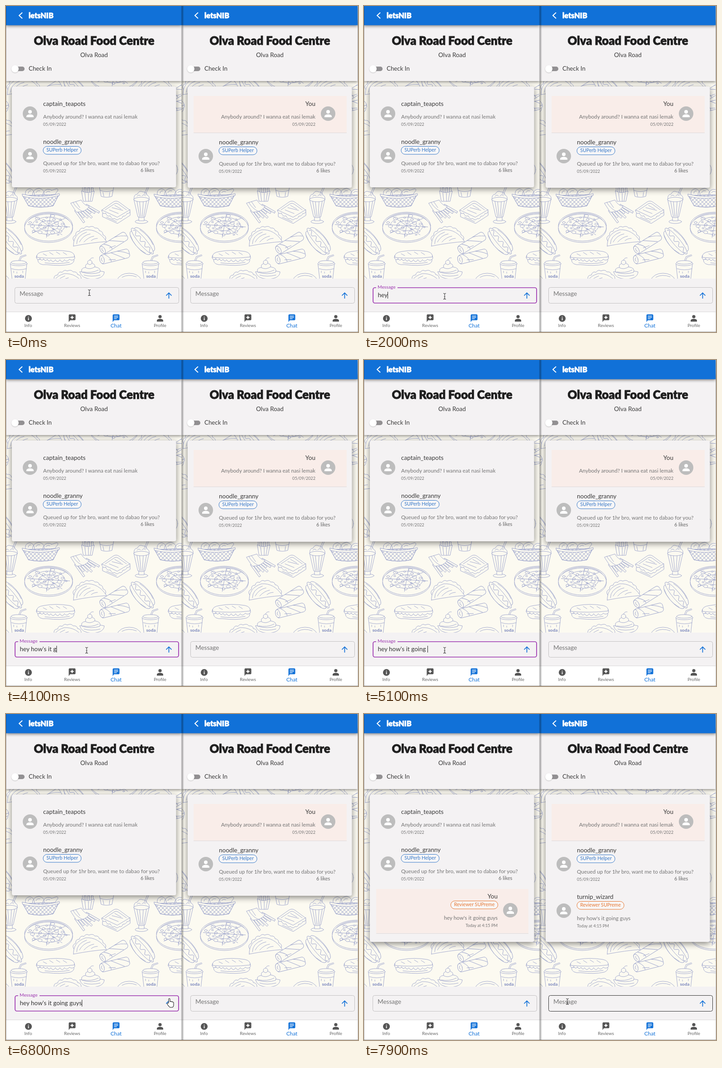
Animation, 777 px wide and 721 px high, one loop 8000 ms. Source, as an HTML page:

```html
<!DOCTYPE html>
<html lang="en">
<head>
<meta charset="utf-8">
<title>Food centre chat</title>
<style>
  html, body { margin: 0; width: 100%; height: 100%; overflow: hidden; background: #fff; }
  svg { display: block; font-family: Lato, "Open Sans", sans-serif; }
  .doodle { stroke: #9aa2cb; stroke-width: .9; fill: #fcfaf1; stroke-linejoin: round; stroke-linecap: round; }
  .doodle .line { fill: none; }
  .doodle .crumbs { fill: none; stroke-dasharray: 1 4; }
  .card { filter: drop-shadow(0 4px 7px #0007); }
  .bar { filter: drop-shadow(0 2px 3px #0007); }
  .title { font-weight: 900; stroke-width: .8; paint-order: stroke; }
</style>
</head>
<body>
<svg id="stage" width="777" height="721" viewBox="0 0 777 721"></svg>
<script>
const BLUE = '#1171d8', ORANGE = '#e5762f', PURPLE = '#9c33af', INK = '#3a3a3a', GREY = '#747474', PANE = '#f4f2f3';
const LOOP = 8000, CLICK = 600, SENT = 6850, MESSAGE = "hey how's it going guys";
const stage = document.getElementById('stage');
const range = n => [...Array(n).keys()];

const path = (d, attrs = '') => `<path d="${d}" ${attrs}/>`;
const line = d => path(d, 'class="line"');
const crumbs = d => path(d, 'class="crumbs"');
const oval = (x, y, rx, ry = rx, attrs = '') => `<ellipse cx="${x}" cy="${y}" rx="${rx}" ry="${ry}" ${attrs}/>`;
const rect = (x, y, w, h, fill, attrs = '') => `<rect x="${x}" y="${y}" width="${w}" height="${h}" fill="${fill}" ${attrs}/>`;
const text = (x, y, s, size, fill, anchor = 'start', attrs = '') =>
  `<text x="${x}" y="${y}" font-size="${size}" fill="${fill}" text-anchor="${anchor}" ${attrs}>${s}</text>`;
const group = (inner, transform) => `<g transform="${transform}">${inner}</g>`;

// Food doodles
function pizza() {
  const toppings = range(26).map(i => {
    const a = i * 2.4, r = 8.4 * Math.sqrt(i + 1);
    return oval(94 + r * Math.cos(a), 486 + r * .54 * Math.sin(a), 2 + i % 3 * 1.2, 1.5 + i % 3 * .8);
  });
  const spokes = range(4).map(i => {
    const a = i * Math.PI / 4 + .1, x = 47 * Math.cos(a), y = 26 * Math.sin(a);
    return line(`M${94 - x} ${486 - y}L${94 + x} ${486 + y}`);
  });
  return oval(94, 493, 53, 30) + oval(94, 486, 53, 30) + oval(94, 486, 47, 26) +
    oval(94, 486, 50, 28, 'class="crumbs"') + oval(94, 490, 53, 30, 'class="crumbs"') +
    oval(94, 486, 36, 19, 'class="crumbs"') + oval(94, 486, 22, 11, 'class="crumbs"') +
    toppings.join('') + spokes.join('');
}

const basket = () =>
  path('M44 420q-5-13 8-16q11 2 11 15zM58 420q0-15 15-17q16 4 10 20zM80 420q4-18 18-14q12 4 6 16z') +
  line('M49 414q1-6 6-5M66 413q3-6 9-4M88 413q4-5 9-2M100 408l12-4q5 2 1 6l-6 8') +
  path('M37 419L117 417L104 442Q76 448 50 442Z') +
  path('M37 419L117 417L104 442Q76 448 50 442Z', 'style="fill:url(#net)"') +
  path('M36 416Q76 427 118 415l0 4Q76 431 37 421z');

const fries = () =>
  range(7).map(i => group(rect(0, -2, 33 - i % 3 * 5, 4, '#fcfaf1'), `translate(${177 - i * 4} ${440 + i * 2}) rotate(${30 + i * 4})`)).join('') +
  path('M143 436l23-7q6 12 18 14q-8 13-28 13z') + line('M148 434q6 13 22 21M154 433l9 13') +
  range(6).map(i => rect(169 + i * 4, 399 + i % 2 * 3, 3.5, 14, '#fcfaf1')).join('') +
  path('M167 409q13 7 28 0l-5 23h-19z') + line('M174 413l2 18M182 414v18M189 413l-3 18');

const sandwich = () =>
  path('M213 459v7l33 15l28-18v-8z') +
  path('M211 452q3 10 9 6q3 9 10 6q4 9 10 6q6 6 10 0q6 2 8-5q7 0 9-6q7 1 7-8z') +
  path('M212 451L236 434Q243 429 250 434L273 451L246 467Z') +
  line('M219 451L240 437Q244 435 248 438L266 451') + crumbs('M228 451l20 8M234 446l24 6M240 441l14 8M222 467l22 10');

const shake = () =>
  oval(299, 477, 14, 4) + path('M293 464v11h12v-11z') +
  path('M282 427L291 466q8 4 16 0L316 427z') + line('M289 432l6 34M295 433l3 33M303 433l-2 33M310 432l-6 34') +
  path('M283 427q-2-10 7-11q4-9 12-5q9 0 9 7q6 2 5 9z') + oval(299, 428, 17, 5) +
  line('M305 416l8-18M308 417l8-18M289 421q4-5 8-1M300 420q5-5 8 0');

const taco = () =>
  path('M150 520q-6-9 4-13q-1-9 8-9q2-9 10-6q5-7 11-3q9-4 13 2q9-1 10 6q8 1 8 9q8 3 6 10z') +
  path('M149 531Q148 504 176 495Q204 493 222 521Q190 523 149 531Z') +
  line('M156 526Q156 508 178 500') + crumbs('M162 522q8-15 24-18M172 522q10-11 22-13M188 519q6-5 14-5');

const hotdog = () => group(
  oval(301, 526, 33, 11) + oval(301, 514, 33, 11) + oval(301, 520, 37, 8) +
  line('M270 520' + 'q4-7 8 0t8 0'.repeat(4)) + line('M274 532q26 10 52 0M278 508q24-7 44-1'), 'rotate(50 301 520)');

const roll = (x, y, angle) => group(
  rect(-33, -10, 66, 20, '#fcfaf1', 'rx="6"') + oval(-29, 0, 5, 9) +
  line('M-29 4q-3-5 1-8M-20-9q12 10 10 18M-6-10l26 19M8-10q14 4 24 12M-14 4l14 3'),
  `translate(${x} ${y}) rotate(${angle})`);

const sub = () =>
  path('M70 561Q70 574 90 572Q120 576 142 571Q152 568 150 558z') +
  path('M67 557' + 'q4 8 8 1'.repeat(4) + 'q5 9 10 0'.repeat(3) + 'q5 7 11-1q7 5 12-2l-1-6H68z') +
  path('M68 556Q66 545 84 543Q110 538 140 543Q152 546 151 555Q110 560 68 556Z') +
  line('M82 548l8 4M96 545l8 5M111 544l8 5M126 545l8 5') + crumbs('M86 568q28 4 54-1');

const soda = () =>
  line('M27 566l5-12l12-4M30 566l4-10l11-4') + path('M10 570h36l-4 36H14z') +
  oval(28, 570, 19, 4.5) + oval(28, 567, 17, 4) + line('M12 581q16 5 33 0M17 586v4M24 588v3M37 586v4') +
  text(29, 601, 'soda', 10, '#8d97c6', 'middle', 'stroke="none" font-weight="900"');

const sundae = () =>
  path('M163 588Q190 581 217 588Q216 603 190 604Q166 603 163 588Z') +
  path('M168 589q-5-9 8-11q-3-8 9-9q13 0 11 8q15 2 11 12q-18 6-39 0z') +
  line('M176 579q10 5 20-2M170 588q18 4 34-4M172 595q16 5 36 0') + oval(185, 567, 5) + line('M185 562q2-6 8-5');

const tile = () =>
  basket() + fries() + path('M206 399l4 22q12 4 24 0l4-22z') + line('M208 408q14 5 28 0M214 412l2 9M229 412l-1 9') +
  sandwich() + shake() + pizza() + taco() + hotdog() + roll(238, 524, -32) + roll(240, 554, -14) + sub() + soda() +
  sundae() + group(taco(), 'translate(-48 97)') + path('M244 607q8-16 28-16q20 0 28 16z') + crumbs('M256 600q14-8 32-1');

// Interface parts
const avatar = (x, y) => oval(x, y, 16, 16, 'fill="#bdbdbd"') + oval(x, y - 4, 4, 4, 'fill="#fff"') +
  path(`M${x - 8} ${y + 8}v-2q0-4 8-4.500q8 .5 8 4.500v2z`, 'fill="#fff"');
const chip = (x, y, w, label, color) =>
  rect(x + .5, y + .5, w, 17.5, '#f8f6f7', `rx="8.700" stroke="${color}"`) +
  text(x + w / 2 + .5, y + 12.3, label, 10.7, color, 'middle');

// One message; mine is aligned to the right edge
function post({ x, y, who, body, date, badge, likes }) {
  const mine = who === 'You', anchor = mine ? 'end' : 'start', lift = badge ? 19 : 0;
  const w = badge === 'SUPerb Helper' ? 84 : 104;
  return text(x, y + .5, who, 13.5, INK, anchor) +
    (badge ? chip(mine ? x - w : x - .5, y + 6, w, badge, w > 90 ? ORANGE : '#3478c8') : '') +
    text(x, y + 29 + lift, body, 11.7, GREY, anchor) +
    text(x, y + 45 + lift, date, 9.2, GREY, anchor) +
    (likes ? text(x + 215, y + 63, likes, 11, '#666') : '') +
    avatar(x + (mine ? 28 : -29), y + 18 + (badge ? 9 : 0));
}
const tint = (x, y, w, h) => rect(x, y, w, h, '#f9ede9') + rect(x, y + h, w, 1, '#dedbdc');

const nav = () => {
  const bubble = (x, fill) => path(`M${x - 7.5} 684q0-2 2-2h11q2 0 2 2v9q0 2-2 2h-10l-3 4z`, `fill="${fill}"`);
  return rect(0, 677, 388, 44, '#fff') + rect(0, 676, 388, 1, '#d9d8d9') +
    oval(49.5, 691, 7.6, 7.6, 'fill="#555"') + rect(48.7, 690, 1.7, 5, '#fff') + rect(48.7, 687, 1.7, 1.7, '#fff') +
    bubble(146, '#555') + path('M146 684l1.400 3.400l3.400 1.400l-3.400 1.400l-1.400 3.400l-1.400-3.400l-3.400-1.400l3.400-1.400z', 'fill="#fff"') +
    bubble(243, BLUE) + rect(238.5, 685, 9, 1.3, '#fff') + rect(238.5, 688, 9, 1.3, '#fff') + rect(238.5, 691, 6, 1.3, '#fff') +
    oval(340, 687, 3.6, 3.6, 'fill="#555"') + path('M333 698v-2q0-4 7-4.300q7 .3 7 4.300v2z', 'fill="#555"') +
    text(49, 710, 'Info', 9.8, '#666', 'middle') + text(146, 710, 'Reviews', 9.8, '#666', 'middle') +
    text(243, 711, 'Chat', 11.9, BLUE, 'middle') + text(340, 710, 'Profile', 9.8, '#666', 'middle');
};

function panel(side) {
  const right = side === 'right', dy = right ? 1 : 0;
  const helper = { x: 82, y: 304 + dy, who: 'noodle_granny', badge: 'SUPerb Helper', likes: '6 likes',
    body: 'Queued up for 1hr bro, want me to dabao for you?', date: '05/09/2022' };
  const first = { y: 220, body: 'Anybody around? I wanna eat nasi lemak', date: '05/09/2022' };
  const reply = { badge: 'Reviewer SUPreme', body: MESSAGE, date: 'Today at 4:15 PM' };
  const input = right ? '' : rect(27, 619, 47, 7, PANE, 'id="notch"') +
    text(30.5, 644, '', 13.5, '#333', 'start', 'id="typed" xml:space="preserve"') + rect(0, 632, 1, 15, '#222', 'id="caret"');
  return `<svg x="${right ? 388 : 0}" width="389" height="721">` +
    `<svg y="166" width="388" height="437" viewBox="0 166 388 437">${rect(0, 166, 388, 437, '#fcfaf1')}<use href="#food"/>` +
    rect(13, 178, 362.5, 223 + dy, PANE, `rx="4" class="card" id="${side}Card"`) + '</svg>' +
    rect(0, 30, 388, 136, PANE, 'class="bar"') + rect(0, 0, 388, 42.5, BLUE, 'class="bar"') +
    path('M36 14.500l-7 6.500l7 6.500', 'fill="none" stroke="#fff" stroke-width="2"') +
    text(50, 27, 'letsNIB', 16.3, '#fff', 'start', 'class="title" stroke="#fff"') +
    text(194.5, 85.5, 'Olva Road Food Centre', 25.6, '#1f1f1f', 'middle', 'class="title" stroke="#1f1f1f"') +
    text(194.5, 112.5, 'Olva Road', 13.5, '#3c3c3c', 'middle') +
    rect(17, 134, 24, 10, '#929092', 'rx="5"') + oval(20, 139, 8, 8, 'fill="#fff" style="filter:drop-shadow(0 1px 1px #0003)"') +
    text(50, 143, 'Check In', 13.3, '#3c3c3c') +
    (right ? tint(26, 199, 338, 81) + post({ ...first, x: 295, who: 'You' }) : post({ ...first, x: 82, who: 'captain_teapots' })) +
    post(helper) +
    `<g id="${side}Reply">` + (right ? post({ ...reply, x: 82, y: 408, who: 'turnip_wizard' })
      : tint(27, 387, 336, 98) + post({ ...reply, x: 295, y: 407, who: 'You' })) + '</g>' +
    rect(0, 603, 388, 74, PANE) +
    rect(19.5, 622.5, 362, 35, 'none', `rx="4" id="${side}Box"`) + input +
    text(30, 641, 'Message', 13.6, GREY, 'start', `id="${side}Label"`) +
    path('M359.500 647v-12M353.500 640.500l6-6l6 6', `fill="none" stroke="${BLUE}" stroke-width="1.700"`) +
    nav() + '</svg>';
}

stage.innerHTML = `<defs>
  <pattern id="net" width="6" height="6" patternUnits="userSpaceOnUse" patternTransform="rotate(45)">
    <path d="M0 0H6M0 0V6" stroke="#9aa2cb" stroke-width="1.600"/></pattern>
  <linearGradient id="seam"><stop stop-color="#0000"/><stop offset=".4" stop-color="#0005"/><stop offset="1" stop-color="#0000"/></linearGradient>
  <g id="tile">${tile()}</g>
  <g id="food" class="doodle">
    ${[-146, 145, 436].map(x => `<use href="#tile" x="${x}" y="-335"/>`).join('')}
    ${group(hotdog(), 'translate(-310 -158)') + oval(369, 362, 10, 14)}
    ${[-291, 0, 291].map(x => `<use href="#tile" x="${x}"/>`).join('')}
  </g></defs>` + panel('left') + panel('right') +
  rect(386, 0, 7, 721, 'url(#seam)') + rect(0, 0, 1, 721, '#0004') + rect(0, 720, 777, 1, '#0005') + rect(776, 0, 1, 721, '#0003') +
  `<g id="beam">${path('M-3-6.500q3 0 3 2v9q0 2-3 2M3-6.500q-3 0-3 2M0 4.500q0 2 3 2M-1.500 1h3', 'fill="none" stroke="#444" stroke-width="1.100"')}</g>
  <g id="hand">${path('M-3 1v-8q0-2 1.500-2t1.500 2v5q2-1 3 .5q2-1 3 .7q2-.5 2 1.500v5q0 4-3 5h-5q-3-2-6-7q-.5-2 1-2.200z', 'fill="#fff" stroke="#222" stroke-width="1.100"')}</g>`;

const el = id => document.getElementById(id);
const set = (id, attrs) => { for (const k in attrs) el(id).setAttribute(k, attrs[k]); };
const show = (id, on) => el(id).setAttribute('visibility', on ? 'visible' : 'hidden');
const clamp = v => Math.min(1, Math.max(0, v));
const ease = v => v * v * (3 - 2 * v);
const settle = (t, from) => 1 - (1 - clamp((t - from) / 200)) ** 3;

// Start time, end time, number of letters reached
const bursts = [[1100, 1700, 3], [2300, 3100, 8], [3300, 4800, 19], [5150, 5700, 23]];
const keys = [];
for (const [from, to, end] of bursts) {
  const n = end - keys.length;
  range(n).forEach(i => keys.push(from + (to - from) * i / (n - 1)));
}

const mousePath = [[0, 184, 634], [200, 184, 634], [CLICK, 178, 642], [5850, 178, 642], [6300, 322, 629], [6600, 362, 638],
  [6930, 362, 638], [7200, 449, 636], [LOOP, 449, 636]];
function mouseAt(t) {
  const i = mousePath.findIndex(p => p[0] > t);
  const [t0, x0, y0] = mousePath[i - 1], [t1, x1, y1] = mousePath[i];
  const k = ease((t - t0) / (t1 - t0));
  return [x0 + (x1 - x0) * k, y0 + (y1 - y0) * k];
}

function draw(t) {
  const sent = t >= SENT, focus = t >= CLICK && !sent;
  const [mx, my] = mouseAt(t);
  const overSend = mx > 346 && mx < 375;
  set('beam', { transform: `translate(${mx} ${my})` });
  set('hand', { transform: `translate(${mx} ${my})` });
  show('beam', !overSend);
  show('hand', overSend);

  set('leftCard', { height: sent ? 326 : 223 });
  set('rightCard', { height: sent ? 326 : 224 });
  show('leftReply', sent);
  show('rightReply', sent);

  const float = settle(t, CLICK) - settle(t, SENT + 30);
  set('leftLabel', { y: 641 - 16 * float, 'font-size': 13.6 - 3.3 * float });
  el('leftLabel').style.fill = `color-mix(in srgb, ${PURPLE} ${float * 100}%, ${GREY})`;
  show('notch', float > .3);

  // The focused outline is thicker and grows inwards
  const border = hover => hover ? '#333' : '#c3c1c2';
  const inset = focus ? .5 : 0;
  set('leftBox', { x: 19.5 + inset, y: 622.5 + inset, width: 362 - 2 * inset, height: 35 - 2 * inset,
    stroke: focus ? PURPLE : border(sent && mx < 382), 'stroke-width': focus ? 1.7 : 1 });
  set('rightBox', { stroke: border(mx > 408) });

  const count = keys.filter(k => k <= t).length;
  const typed = el('typed');
  typed.textContent = sent ? '' : MESSAGE.slice(0, count);
  const last = count ? keys[count - 1] : CLICK;
  set('caret', { x: 30.5 + (typed.textContent ? typed.getComputedTextLength() : 0) });
  show('caret', focus && (t - last) % 1000 < 500);
}

const start = performance.now();
function tick() {
  draw((performance.now() - start) % LOOP);
  requestAnimationFrame(tick);
}
tick();
</script>
</body>
</html>
```
